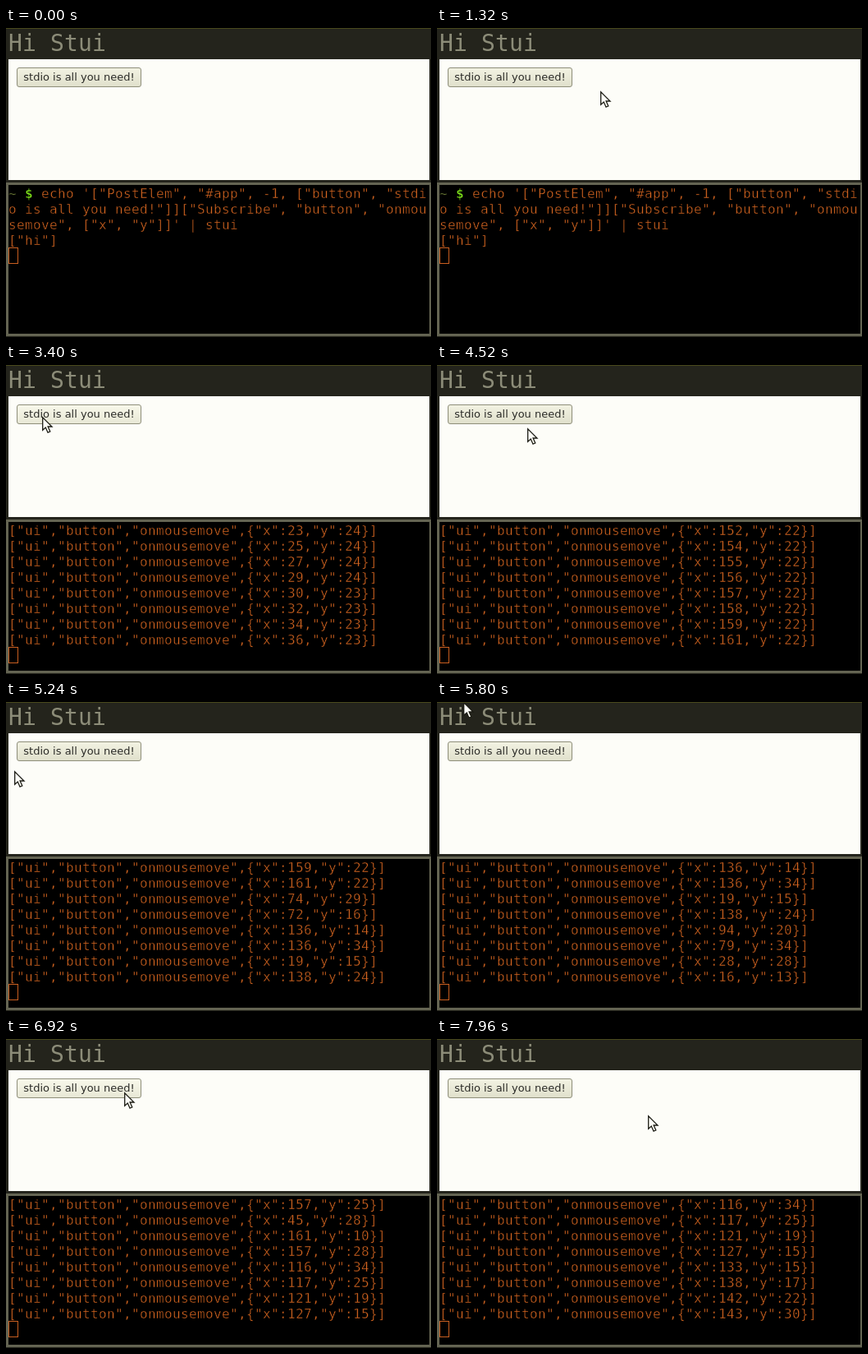
Animation, 518 px wide and 376 px high, one loop 8000 ms. Source, as an HTML page:

```html
<!DOCTYPE html>
<html lang="en">
<head>
<meta charset="utf-8">
<title>Hi Stui</title>
<style>
  html, body { margin: 0; width: 100%; height: 100%; overflow: hidden; }
  #stage {
    position: relative; width: 518px; height: 376px; overflow: hidden;
    background: #24241c; box-sizing: border-box; border-top: 1px solid #48481c;
  }
  #stage > * { position: absolute; box-sizing: border-box; margin: 0; }
  h1, pre { font-family: "DejaVu Sans Mono", monospace; font-weight: 400; white-space: pre; }
  h1 {
    left: 3px; top: -1px; font-size: 28px; line-height: 37px;
    letter-spacing: calc(17px - 1ch); color: #8c8c78;
  }
  #page { left: 3px; top: 37px; width: 513px; height: 147px; background: #fdfdf8; }
  #button {
    left: 13px; top: 47px; width: 152px; height: 24px;
    border: 1px solid #8e8e7a; border-radius: 3px;
    background: linear-gradient(#f2f2e2, #e0e0cc);
    font: 13px/22px "DejaVu Sans", sans-serif; color: #2c2c28;
    text-align: center; white-space: nowrap;
  }
  #button.hover { background: linear-gradient(#f8f8ea, #e8e8d6); }
  #terminal {
    left: 0; top: 187px; width: 518px; height: 187px;
    border: 3px solid #646452; border-right-width: 2px; background: #000;
  }
  /* the black outline thins the strokes */
  #rows {
    left: 3px; top: 191px; font-size: 16px; line-height: 19px;
    letter-spacing: calc(10px - 1ch); color: #d26420;
    -webkit-text-stroke: .4px #000;
  }
  #rows i { font-style: normal; color: #78883c; }
  #rows b { color: #86f01c; }
  #caret { left: 3px; width: 12px; height: 20px; border: 1px solid #c85e20; }
  #pointer { left: 0; top: -1px; overflow: visible; }
</style>
</head>
<body>
<div id="stage">
  <h1>Hi Stui</h1>
  <div id="page"></div>
  <div id="button">stdio is all you need!</div>
  <div id="terminal"></div>
  <pre id="rows"></pre>
  <div id="caret"></div>
  <svg id="pointer" width="14" height="21">
    <path d="M.7 .8V16.2L4.3 13L7 19.2L9.8 18L7.1 12H12Z" fill="#fffff8" stroke="#1c1c14" stroke-width="1.3"/>
  </svg>
</div>
<script>
  // Time is counted in ticks of 1/60 s, the rate of mouse move events.
  const LOOP = 480, LOG_DELAY = 3, VISIBLE_ROWS = 8, ROW = 19;
  const intro = [
    `<i>~</i> <b>$</b> echo '["PostElem", "#app", -1, ["button", "stdi`,
    `o is all you need!"]]["Subscribe", "button", "onmou`,
    `semove", ["x", "y"]]' | stui`,
    `["hi"]`
  ];

  const key = (tick, x, y, circling = false) => ({ tick, x, y, circling });
  const keys = [
    key(0, 530, 330), key(29, 8, 150), key(42, 300, 33), key(79.2, 199, 77),
    // slow sweep to the left, off the button, then back over it to the right
    key(87, 164, 57.6), key(134, 117, 74.4), key(146.4, 149, 122),
    key(190, 17, 66), key(204, 44, 63), key(250, 153.34, 63), key(258, 162.54, 63),
    key(262, 250, 90), key(271.2, 110, 77),
    key(348, 32, 0, true), key(415.2, 144, 64, true),
    key(424, 150, 140), key(453.6, 100, 92), key(470, 268, 80), key(477.6, 257, 93)
  ];

  function pointerAt(tick) {
    const next = keys.findIndex(k => k.tick > tick);
    if (next < 0) return keys[keys.length - 1];
    const a = keys[next - 1], b = keys[next];
    const u = (tick - a.tick) / (b.tick - a.tick);
    const swing = b.circling ? Math.sin(Math.PI * u) : 0;
    const angle = 2 * Math.PI * (tick - a.tick) / 18;
    return {
      x: a.x + (b.x - a.x) * u + 70 * swing * Math.cos(angle),
      y: a.y + (b.y - a.y) * u + 90 * swing * Math.sin(angle)
    };
  }

  const toPage = ({ x, y }) => ({ x: Math.round(x - 2), y: Math.round(y - 41) });
  const onButton = ({ x, y }) => x >= 10 && x <= 162 && y >= 10 && y <= 34;

  const log = [];
  for (let tick = 0; tick < LOOP; tick++) {
    const at = toPage(pointerAt(tick));
    if (onButton(at)) {
      const text = `["ui","button","onmousemove",${JSON.stringify(at)}]`;
      log.push({ tick: tick + LOG_DELAY, text });
    }
  }

  const [button, rows, caret, pointer] =
    ["button", "rows", "caret", "pointer"].map(id => document.getElementById(id));
  let shown = -1;

  function draw(tick) {
    const at = pointerAt(tick);
    pointer.style.transform = `translate(${Math.round(at.x)}px, ${Math.round(at.y)}px)`;
    button.classList.toggle("hover", onButton(toPage(at)));

    const printed = log.filter(entry => entry.tick <= tick);
    if (printed.length !== shown) {
      shown = printed.length;
      const lines = [...intro, ...printed.map(entry => entry.text)].slice(-VISIBLE_ROWS);
      rows.innerHTML = lines.join("\n");
      caret.style.top = 190 + ROW * lines.length + "px";
    }
  }

  const start = performance.now();
  function run() {
    draw((performance.now() - start) * 60 / 1000 % LOOP);
    requestAnimationFrame(run);
  }
  run();
</script>
</body>
</html>
```
